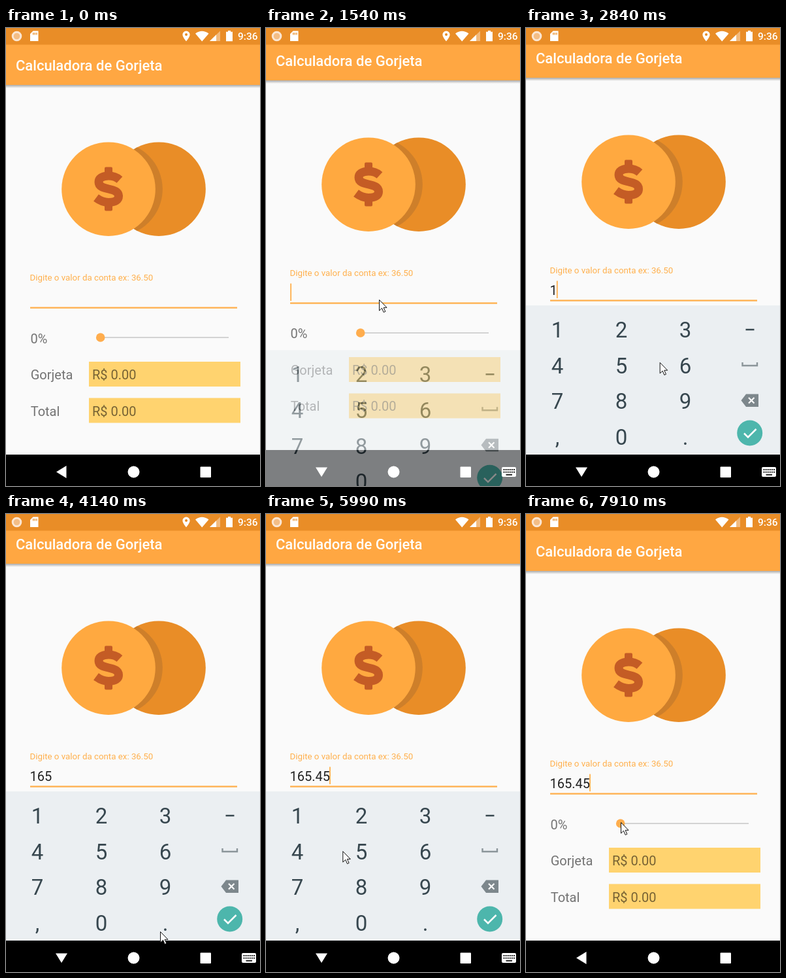
Recreate the animation shown at these times as an HTML page. Size 389 by 700 pixels, loop 7.99 s.

```html
<!DOCTYPE html>
<html lang="pt">
<head>
<meta charset="utf-8">
<title>Calculadora de Gorjeta</title>
<style>
html, body { margin: 0; height: 100%; overflow: hidden; background: #000; }
svg { display: block; width: 100%; height: 100%; }
text { font: 20px Roboto, sans-serif; white-space: pre; }
.label { fill: #000; fill-opacity: .54; }
.key { font-size: 33px; text-anchor: middle; fill: #37474f; }
</style>
</head>
<body>
<svg viewBox="0 0 389 700">
  <defs>
    <linearGradient id="shade" x2="0" y2="1">
      <stop stop-color="#000" stop-opacity=".32"/>
      <stop offset="1" stop-color="#000" stop-opacity="0"/>
    </linearGradient>
    <clipPath id="backCoin"><circle cx="234" cy="246.2" r="71.8"/></clipPath>
  </defs>

  <g id="app">
    <rect width="389" height="652" fill="#fafafa"/>
    <rect y="87" width="389" height="5" fill="url(#shade)"/>
    <rect y="20" width="389" height="67" fill="#ffa742"/>
    <text x="15" y="65.3" fill="#fff" style="font-size:22px;font-weight:500">Calculadora de Gorjeta</text>

    <circle cx="234" cy="246.2" r="71.8" fill="#e98d27"/>
    <circle cx="168" cy="246.2" r="71.8" fill="#ce7f2a" clip-path="url(#backCoin)"/>
    <circle cx="157" cy="246.2" r="71.8" fill="#ffa940"/>
    <g fill="#c45c25">
      <path d="M174 232C169 227.500 163 226 157 226C147 226 142 230 142 235.500C142 242 148 244 157 246C166 248 172.500 250 172.500 257C172.500 263 167 266.500 157 266.500C150 266.500 144 264 138 259.500" fill="none" stroke="#c45c25" stroke-width="13"/>
      <rect x="151" y="212.500" width="12" height="12" rx="2"/>
      <rect x="151" y="268" width="12" height="11.500" rx="2"/>
    </g>

    <text x="36.5" y="386" fill="#ffb04d" style="font-size:13.3px">Digite o valor da conta ex: 36.50</text>
    <text id="value" x="36.5" y="419" fill="#212121"></text>
    <rect id="caret" y="397.5" width="1.8" height="26.5" fill="#ffb04d"/>
    <rect x="37" y="426.4" width="317" height="2.3" fill="#ffb04d"/>

    <text class="label" x="37.5" y="481.5">0%</text>
    <rect x="145" y="472" width="196" height="2" fill="#d3d3d3"/>
    <circle cx="144.7" cy="473" r="6.8" fill="#ffad4d"/>
    <text class="label" x="37.7" y="537">Gorjeta</text>
    <text class="label" x="37.7" y="592.5">Total</text>
    <rect x="127" y="510" width="232" height="38" fill="#ffd36f"/>
    <rect x="127" y="565.5" width="232" height="38" fill="#ffd36f"/>
    <text class="label" x="132" y="537">R$ 0.00</text>
    <text class="label" x="132" y="592.5">R$ 0.00</text>
    <rect y="652" width="389" height="60"/>
  </g>

  <g fill="#fff">
    <rect width="389" height="25.5" fill="#e98d27"/>
    <circle cx="16.5" cy="12.5" r="6.3" fill="#f3bd85" stroke="#fbe6d2" stroke-width="3"/>
    <path d="M41.5 4.5H49.5V20H37V9z"/>
    <path d="M41.7 7v3.5M44.3 7v3.5M46.9 7v3.5" stroke="#e98d27" stroke-width="1.3"/>
    <path id="pin" fill-rule="evenodd" d="M276 4.5a5.6 5.6 0 0 1 5.6 5.6c0 4.2-5.6 10.2-5.6 10.2s-5.6-6-5.6-10.2a5.6 5.6 0 0 1 5.6-5.6zm0 3.6a2 2 0 1 0 .01 0z"/>
    <path d="M290 8.5Q300 1 310.500 8.500L300.200 20.500z"/>
    <path d="M328 4.500V20H312z" opacity=".4"/>
    <path d="M322 10.300V20H312z"/>
    <path d="M340 4h4v1.700h3V20.300H337V5.700h3z"/>
    <text x="355" y="18" style="font-size:15.5px;font-weight:500">9:36</text>
  </g>

  <g id="keyboard">
    <rect y="424" width="389" height="228" fill="#ebeff2"/>
    <rect id="press" width="97.5" height="54.7" fill="#dadee0"/>
    <g id="keys"></g>
    <path d="M336.5 461h13" stroke="#37474f" stroke-width="2.5"/>
    <path d="M331.5 511v5h22.5v-5" fill="none" stroke="#8b959a" stroke-width="2.4"/>
    <path d="M337 559.5H356V579H337l-7.5-9.7z" fill="#7d878c"/>
    <path d="M341 565l8.5 8.5m0-8.5l-8.5 8.5" stroke="#fff" stroke-width="2.2"/>
    <circle id="done" cx="342.7" cy="619" r="19.5"/>
    <path d="M334 619.5l6 6 12.5-12.5" fill="none" stroke="#fff" stroke-width="2.5"/>
  </g>

  <g fill="#fff">
    <path id="back"/>
    <circle cx="195.5" cy="678.5" r="9"/>
    <rect x="297.5" y="670.5" width="16.5" height="16.5" rx="1"/>
    <g id="switcher">
      <rect x="361" y="671" width="22" height="15" rx="2"/>
      <path d="M363.5 675h17.5M363.5 678.7h17.5" stroke="#222" stroke-width="2" stroke-dasharray="2 1.1"/>
      <path d="M367.5 682.8h9.5" stroke="#222" stroke-width="2"/>
    </g>
  </g>

  <path id="cursor" d="M.5.5V17l4-3.800 2.700 6.300 2.600-1.200-2.700-6H12z" fill="#fff" stroke="#111"/>
</svg>
<script>
const $ = id => document.getElementById(id);
const LOOP = 7990, TICK = 76.83, BLINK = 495, ROW = 54.7, COLUMN = 98;
const MOVE = 620, TOUCH = 80, RELEASE = 230;
const LAYOUT = ['123', '456', '789', ',0.'];

// Cursor stops; a key is typed when it is released there.
const stop = (at, x, y, key) => ({ at, x, y, key, down: at + TOUCH, up: at + RELEASE });
const field = stop(990, 173, 415, '');
const done = stop(6600, 352, 607);
const stops = [
  stop(0, 322, 640), field,
  stop(2160, 50, 466, '1'), stop(3020, 243, 522, '6'), stop(3400, 150, 512, '5'),
  stop(4140, 236, 638, '.'), stop(5040, 65, 508, '4'), stop(5699, 117, 515, '5'),
  done, stop(7910, 145, 471)
];
const inputs = stops.filter(s => s.key !== undefined);

const progress = (t, from, to) => Math.min(1, Math.max(0, (t - from) / (to - from)));
const show = (id, on) => $(id).setAttribute('visibility', on ? 'visible' : 'hidden');
const move = (id, x, y) => $(id).setAttribute('transform', `translate(${x} ${y})`);

LAYOUT.forEach((row, r) => [...row].forEach((c, n) => {
  $('keys').innerHTML += `<text class="key" x="${48 + COLUMN * n}" y="${473 + ROW * r}">${c}</text>`;
}));

function drawCursor(t) {
  let { x, y } = stops[0];
  stops.slice(1).forEach((s, i) => {
    const u = progress(t, Math.max(stops[i].up, s.at - MOVE), s.at);
    const ease = u * u * (3 - 2 * u);
    x += (s.x - x) * ease;
    y += (s.y - y) * ease;
  });
  move('cursor', x, y);
  show('cursor', t >= 300);
}

function drawKeyboard(t) {
  const shown = 1 - (1 - progress(t, field.up + 240, field.up + 470)) ** 2.5;
  const leaving = progress(t, done.up, done.up + 240);
  const gone = leaving ** 2.2;
  move('app', 0, -11 * shown * (1 - leaving) ** 1.4);
  move('keyboard', 0, 188 * (1 - shown) + 45 * gone);
  $('keyboard').setAttribute('opacity', shown ** 1.4 - gone);
  $('done').setAttribute('fill', t > done.down ? '#00a095' : '#4db6ac');

  const held = inputs.find(s => s.key && t >= s.down && t < s.up);
  show('press', held);
  if (held) {
    const row = LAYOUT.findIndex(keys => keys.includes(held.key));
    move('press', COLUMN * LAYOUT[row].indexOf(held.key), 432.6 + ROW * row);
  }
}

function drawField(t) {
  const typed = inputs.filter(s => t >= s.up);
  $('value').textContent = typed.map(s => s.key).join('');
  const end = 36.5 + $('value').getComputedTextLength();
  $('caret').setAttribute('x', Math.max(37.2, end - .9));
  const reset = typed.length ? typed.at(-1).up : BLINK;
  show('caret', Math.floor((t - reset) / BLINK) % 2 === 0);
}

function draw(t) {
  drawCursor(t);
  drawKeyboard(t);
  drawField(t);
  const typing = t > field.up + TOUCH && t < done.up;
  $('back').setAttribute('d', typing ? 'M76 671.5H94L85 686z' : 'M77 678.5L92.5 669V688z');
  show('switcher', typing);
  show('pin', t < 4500);
}

function frame() {
  const t = performance.now() % LOOP;
  draw(Math.floor((t + 10) / TICK) * TICK);
  requestAnimationFrame(frame);
}
frame();
</script>
</body>
</html>
```
